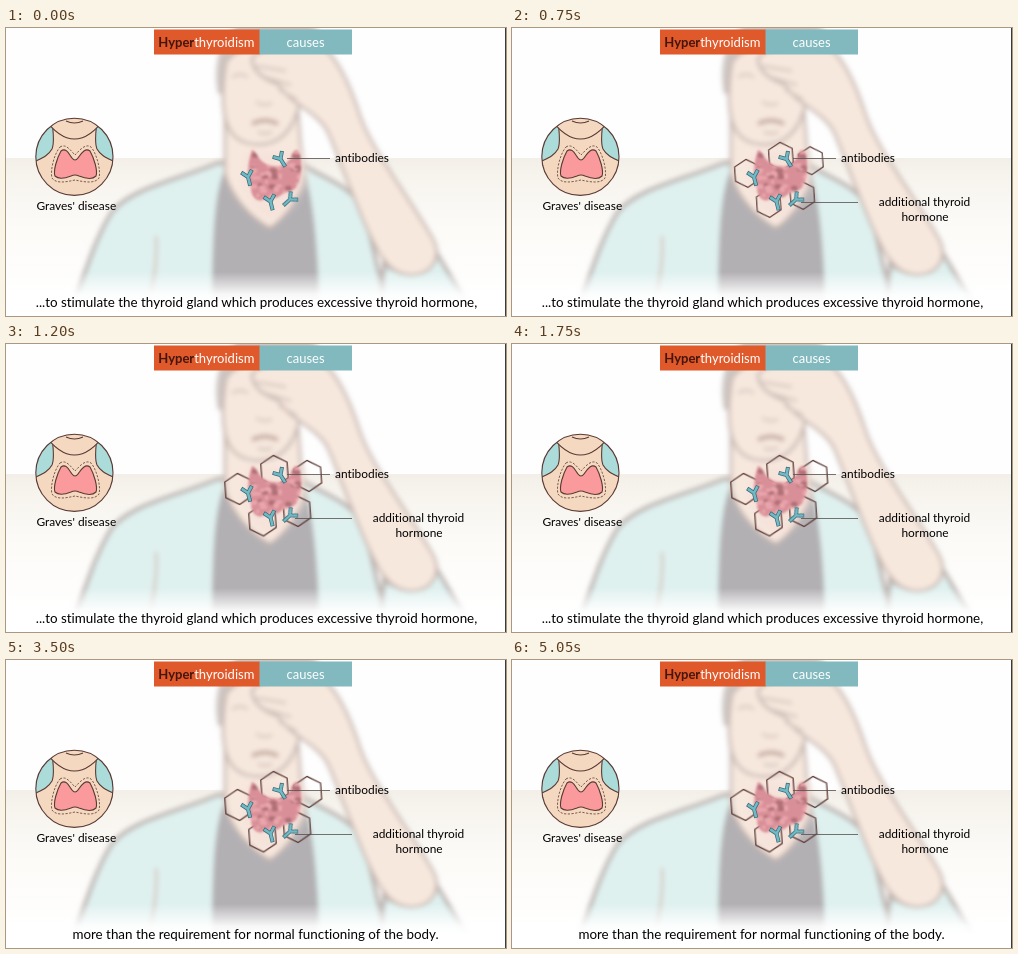
Write an HTML page that moves like this. It is 500 px wide and 288 px high and loops after 5.1 s.

```html
<!DOCTYPE html>
<html lang="en">
<head>
<meta charset="utf-8">
<title>Hyperthyroidism causes</title>
<style>
  html, body { margin: 0; width: 100%; height: 100%; overflow: hidden; background: #fff; }
  svg { display: block; width: 500px; height: 288px; }
  text { font-family: Lato, Carlito, sans-serif; font-size: 11.9px; fill: #000; font-variant-ligatures: none; }
  .mid { text-anchor: middle; }
  .caption { font-size: 13.4px; text-anchor: middle; }
  .title { font-size: 13px; fill: #fff; }
  .title .strong { font-weight: 700; fill: #43150c; }
  .lead { stroke: #55504f; stroke-width: .8; fill: none; }
  .ink { stroke: #5a3a35; stroke-width: 1.1; stroke-linejoin: round; }
  .cloth { fill: #dff1ef; stroke: #bab1ae; stroke-width: 4; }
  .skin { fill: #f7e8de; stroke: #c9bab3; stroke-width: 3; }
  .crease { fill: none; stroke: #d3c2ba; stroke-width: 2.5; }

  .hex, .late, .first, .second { animation: 5.1s linear infinite; }
  .hex { animation-name: grow, appear; fill: none; stroke: #5d3a36; stroke-width: 1.25; }
  .late { animation-name: show; }
  .first { animation-name: leave; }
  .second { animation-name: enter; }

  @keyframes grow {
    0% { transform: translate(var(--from)) scale(.48); animation-timing-function: ease-out; }
    23.5%, 100% { transform: translate(var(--to)) scale(1); }
  }
  @keyframes appear { 0%, .98% { opacity: 0; } 7%, 100% { opacity: 1; } }
  @keyframes show { 0%, .98% { opacity: 0; } 5.9%, 100% { opacity: 1; } }
  @keyframes leave { 0%, 49.01% { opacity: 1; } 49.02%, 100% { opacity: 0; } }
  @keyframes enter { 0%, 49.01% { opacity: 0; } 49.02%, 100% { opacity: 1; } }
</style>
</head>
<body>
<svg viewBox="0 0 500 288" xmlns="http://www.w3.org/2000/svg">
  <defs>
    <filter id="haze" x="-10%" y="-10%" width="120%" height="120%"><feGaussianBlur stdDeviation="2.8"/></filter>
    <filter id="halo" x="-30%" y="-30%" width="160%" height="160%"><feGaussianBlur stdDeviation="4"/></filter>
    <filter id="soft" x="-10%" y="-10%" width="120%" height="120%"><feGaussianBlur stdDeviation=".8"/></filter>
    <linearGradient id="floor" x2="0" y2="1">
      <stop offset="0" stop-color="#f3efe8"/><stop offset=".12" stop-color="#f7f4ee"/>
      <stop offset=".45" stop-color="#fcfbf8"/><stop offset="1" stop-color="#fff"/>
    </linearGradient>
    <linearGradient id="fade" x2="0" y2="1">
      <stop offset="0" stop-color="#fff" stop-opacity="0"/><stop offset=".5" stop-color="#fff" stop-opacity=".9"/>
      <stop offset=".7" stop-color="#fff"/>
    </linearGradient>
    <clipPath id="disc"><circle cx="68.4" cy="128.8" r="38.6"/></clipPath>
    <path id="gland" d="M246 122C250 122 252 131 257 134C262 138 268 139 273 138C280 137 284 133 286 127C288 121 292 120 294 126C296 137 296 150 291 158C287 165 280 163 275 167C270 172 262 169 257 172C250 174 245 168 245 160C240 150 242 133 246 122Z"/>
    <clipPath id="inside"><use href="#gland"/></clipPath>
    <path id="hexagon" d="M0-15.6 13.2-8 13.2 7.8 0 15.6-13.2 7.8-13.2-8Z" transform="rotate(-4)"/>
    <g id="antibody" fill="none">
      <path d="M0 9V0L-5.5-6M0 0 5.5-6" stroke="#356873" stroke-width="4"/>
      <path d="M0 8.4V0L-5-5.5M0 0 5-5.5" stroke="#70b9c5" stroke-width="2.6"/>
    </g>
  </defs>

  <!-- blurred patient -->
  <rect width="500" height="130" fill="#fefefe"/>
  <rect y="130" width="500" height="158" fill="url(#floor)"/>
  <g filter="url(#haze)">
    <path class="cloth" d="M62 292C78 250 88 212 106 184C125 160 172 152 212 135L298 138C322 152 345 158 358 182L384 292Z"/>
    <path class="cloth" d="M374 292 378 236C395 250 418 240 430 224L470 292Z"/>
    <path d="M150 208C152 235 146 262 140 290" class="crease" stroke="#c0c6c4"/>
    <path d="M218 146C211 165 207 195 207 292H312C312 240 308 180 298 146Z" fill="#b3b0b4" stroke="#aaa5a6" stroke-width="2"/>
    <path class="skin" d="M219 88 219 146C225 168 244 189 264 200C281 188 293 166 297 146L292 84Z"/>
    <path d="M212 66C204 25 222-12 264-14C306-14 326 8 324 40L300 60Z" fill="#cdc6c3"/>
    <path class="skin" d="M220 34C215 65 216 92 225 104C235 118 258 121 274 110C291 98 296 76 297 34C280 12 237 10 220 34Z"/>
    <path d="M246 96Q259 89 272 96" fill="none" stroke="#c0a49a" stroke-width="4"/>
    <path class="crease" d="M226 49Q234 44 242 49M250 74Q258 79 266 75M252 104Q259 107 266 104"/>
    <path class="skin" d="M246 31C253 18 285 14 318 20C334 34 345 60 354 88C366 122 398 162 424 206C440 230 424 249 402 247C382 245 372 226 358 194C345 164 334 132 322 104C312 84 284 76 272 56C259 52 246 43 246 31Z"/>
    <path class="crease" d="M250 38 280 43M258 49 285 57M273 62 291 71"/>
  </g>
  <rect y="244" width="500" height="44" fill="url(#fade)"/>
  <rect x="499" width="1" height="288" fill="#3a3a3a"/>

  <!-- title -->
  <rect x="148" y="1.5" width="106" height="25" fill="#e0592b"/>
  <rect x="253.5" y="1.5" width="92.5" height="25" fill="#82b9be"/>
  <text class="title mid" x="200.3" y="18.5"><tspan class="strong">Hyper</tspan>thyroidism</text>
  <text class="title mid" x="299.5" y="18.5">causes</text>

  <!-- neck inset -->
  <g clip-path="url(#disc)">
    <rect x="28" y="88" width="82" height="82" fill="#f5d8c0"/>
    <path class="ink" d="M28 92H46C47 104 49 114 46 121C42 128 36 130 28 134Z" fill="#abdcda"/>
    <path class="ink" d="M109 92H91C90 104 88 114 91 121C95 128 101 130 109 134Z" fill="#abdcda"/>
    <path class="ink" d="M34 84C44 100 56 111 68.5 111S93 100 103 84Z" fill="#f5d8c0" stroke-width=".9"/>
    <path class="ink" d="M60 93Q68.5 97 77 93" fill="none" stroke-width=".9"/>
  </g>
  <circle class="ink" cx="68.4" cy="128.8" r="38.6" fill="none" stroke-width="1.3"/>
  <path d="M54 119C60 115 65 123 69 127C73 123 79 115 85 119C91 126 95 143 93 150C89 156 78 154 69 152C60 154 50 156 46 150C44 143 48 126 54 119Z" fill="none" stroke="#5a3a35" stroke-width=".8" stroke-dasharray="2.2 1.5"/>
  <path class="ink" d="M55 123C60 119 63 126 66 130Q69 134 72 130C75 126 79 119 84 123C88 130 92 143 90 148C86 152 78 150 73 148Q69 146 65 148C60 150 53 152 49 148C47 143 51 130 55 123Z" fill="#fb9a9c" stroke-width=".9"/>
  <text class="mid" x="70.3" y="182">Graves' disease</text>

  <!-- gland, hormones and antibodies -->
  <path d="M240 124 298 124 300 156 283 180 266 192 248 180 235 156Z" fill="#f5e1d9" opacity=".8" filter="url(#halo)"/>
  <g id="hormones"></g>
  <g filter="url(#soft)">
    <use href="#gland" fill="#d98f97"/>
    <g id="mottle" clip-path="url(#inside)" opacity=".7"></g>
  </g>
  <path class="lead" d="M281 130.5H324"/>
  <text x="329" y="134">antibodies</text>
  <g class="late">
    <path class="lead" d="M289 174.5H346"/>
    <text class="mid" x="412.5" y="178">additional thyroid</text>
    <text class="mid" x="413" y="193">hormone</text>
  </g>
  <g id="antibodies"></g>

  <text class="caption first" x="250.5" y="279">...to stimulate the thyroid gland which produces excessive thyroid hormone,</text>
  <text class="caption second" x="249.5" y="279">more than the requirement for normal functioning of the body.</text>
</svg>
<script>
  const $ = id => document.getElementById(id);

  let seed = 11;
  const random = () => (seed = seed * 16807 % 2147483647) / 2147483647;

  // blotches over the gland, darker towards the top
  $('mottle').innerHTML = Array.from({ length: 60 }, () => {
    const x = 242 + random() * 54, y = 121 + random() * 51;
    const fill = random() < (172 - y) / 70 ? '#a0646b' : '#efb0b5';
    return `<ellipse cx="${x}" cy="${y}" rx="${1.5 + random() * 2.5}" ry="${1.2 + random() * 2}" fill="${fill}"/>`;
  }).join('');

  // start and end centre of each hormone
  const hormones = [
    [245, 147, 232.5, 145], [270.5, 134, 268.5, 127], [285.5, 136, 302, 132],
    [287, 169, 291, 167], [257.5, 171, 256.5, 176.5]
  ];
  $('hormones').innerHTML = hormones.map(([x0, y0, x1, y1]) =>
    `<g class="hex" style="--from:${x0}px,${y0}px;--to:${x1}px,${y1}px"><use href="#hexagon"/></g>`).join('');

  // centre and angle of each antibody
  const antibodies = [[274.5, 131, -32], [242, 149, -14], [264.5, 173.5, -14], [284, 171.5, 48]];
  $('antibodies').innerHTML = antibodies.map(([x, y, a]) =>
    `<use href="#antibody" transform="translate(${x} ${y}) rotate(${a})"/>`).join('');
</script>
</body>
</html>
```
